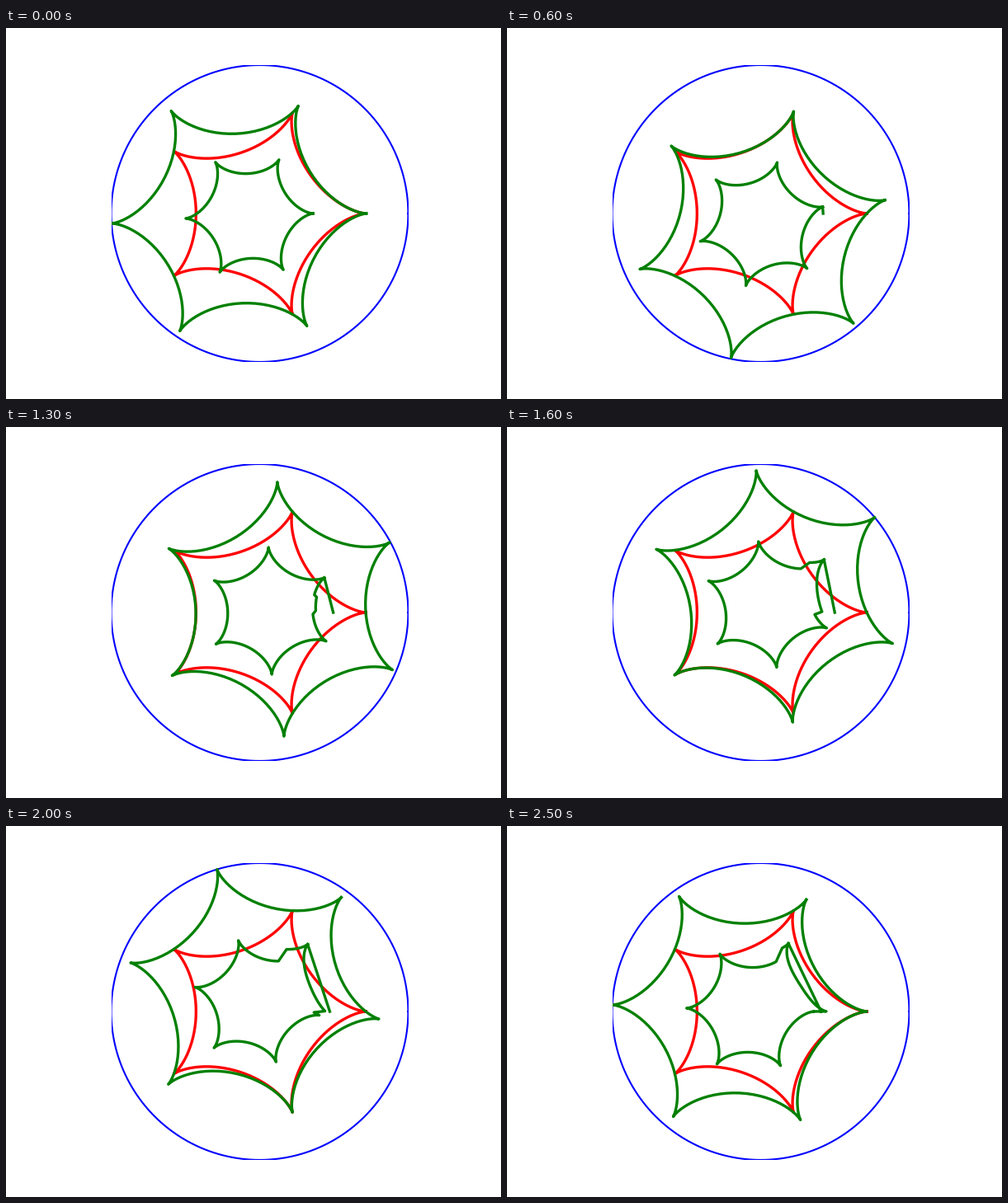
A matplotlib script that plays this animation: 600 by 450 pixels, repeating every 2600 ms.

```python
import numpy as np
import matplotlib.pyplot as plt
from matplotlib.animation import FuncAnimation

FRAMES = 26
INTERVAL = 100
STEP = np.radians(13.5)
CUSPS = 5

t = np.linspace(0, 2 * np.pi, 201)


def hypocycloid(n):
    return (n - 1) * np.exp(1j * t) + np.exp(-1j * (n - 1) * t)


def rolling_curve(theta):
    """Six-cusp hypocycloid rolling around the fixed five-cusp one."""
    spin = np.exp(1j * theta / (CUSPS + 1))
    return spin * hypocycloid(CUSPS + 1) - np.exp(1j * theta)


def inner_curve(z, theta):
    """Half-size polar copy, pushed outwards below a sweeping angle."""
    radius = np.abs(z)
    angle = np.angle(z)
    sector = np.pi / CUSPS
    sweep = sector * (1 + np.tanh(1.27 * (theta - np.pi - sector)))
    pushed = (angle > 1e-3) & (angle < sweep)
    pushed[0] = False
    angle[0] = 0
    return (radius + sweep * pushed) / 2 * np.exp(1j * angle)


def draw(line, z):
    line.set_data(z.real, z.imag)


fig = plt.figure(figsize=(6, 4.5), dpi=100, facecolor="white")
ax = fig.add_axes([127.5 / 600, 0.1, 0.6, 0.8])
ax.set(xlim=(-7, 7), ylim=(-7, 7))
ax.axis("off")

circle, = ax.plot([], [], color="blue", lw=1.5)
fixed, = ax.plot([], [], color="red", lw=2.4)
outer, = ax.plot([], [], color="green", lw=2.4)
inner, = ax.plot([], [], color="green", lw=2.4)
draw(circle, 7 * np.exp(1j * t))
draw(fixed, hypocycloid(CUSPS))


def update(frame):
    theta = (frame + 1) * STEP
    z = rolling_curve(theta)
    draw(outer, z)
    draw(inner, inner_curve(z, theta))
    return outer, inner


anim = FuncAnimation(fig, update, frames=FRAMES, interval=INTERVAL,
                     repeat=True, repeat_delay=0)
plt.show()
```
